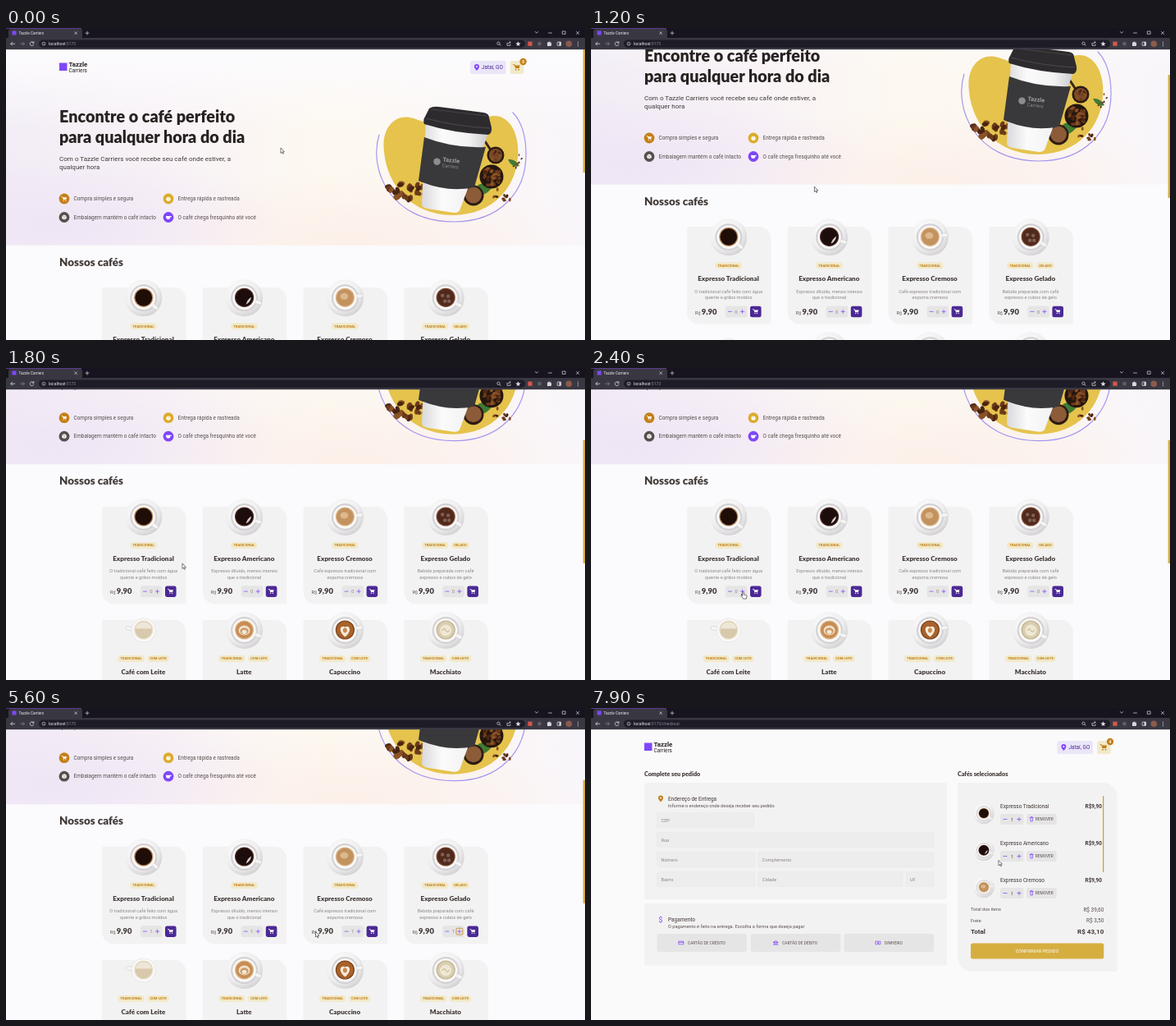
These frames come from a looping animation (706 px wide and 380 px high, 8 s). An HTML page:

```html
<!DOCTYPE html>
<html lang="pt-BR">
<head>
<meta charset="utf-8">
<title>Tazzle Carriers</title>
<style>
html, body { margin: 0; width: 100%; height: 100%; overflow: hidden; background: #fbfafc; }
svg { display: block; width: 706px; height: 380px; font-family: Roboto, sans-serif; }
text { white-space: pre; }
.h { font-family: Lato, sans-serif; font-weight: 900; }
.b { font-weight: 700; }
.m { text-anchor: middle; }
.e { text-anchor: end; }
</style>
</head>
<body>
<svg id="stage" viewBox="0 0 706 380"></svg>
<script>
const PURPLE = '#8047f8', DEEP = '#4b2995', GOLD = '#dbac2c', AMBER = '#c47f17', SAND = '#f1e9c9';
const INK = '#272221', TEXT = '#574f4d', SOFT = '#8d8686', CARD = '#f3f2f2', BUTTON = '#e6e5e5';
const BRAND = ['Tazzle', 'Carriers'];

const text = (x, y, s, size, fill = TEXT, cls = '') =>
  `<text x="${x}" y="${y}" font-size="${size}" fill="${fill}" class="${cls}">${s}</text>`;
const rect = (x, y, w, h, fill, r = 0, more = '') =>
  `<rect x="${x}" y="${y}" width="${w}" height="${h}" rx="${r}" fill="${fill}" ${more}/>`;
const disc = (x, y, r, fill, more = '') => `<circle cx="${x}" cy="${y}" r="${r}" fill="${fill}" ${more}/>`;
const oval = (x, y, rx, ry, fill, turn = 0) =>
  `<ellipse cx="${x}" cy="${y}" rx="${rx}" ry="${ry}" fill="${fill}" transform="rotate(${turn} ${x} ${y})"/>`;
const fillPath = (d, fill, more = '') => `<path d="${d}" fill="${fill}" ${more}/>`;
const line = (d, color, w = 1, more = '') =>
  `<path d="${d}" fill="none" stroke="${color}" stroke-width="${w}" stroke-linecap="round" stroke-linejoin="round" ${more}/>`;
const at = (x, y, body, scale = 1) => `<g transform="translate(${x} ${y}) scale(${scale})">${body}</g>`;
const group = (id, body) => `<g id="${id}">${body}</g>`;

// Panel with small and large corners alternating
const petal = (x, y, w, h, r, R) => fillPath(
  `M${x + r} ${y}h${w - r - R}a${R} ${R} 0 0 1 ${R} ${R}v${h - R - r}a${r} ${r} 0 0 1 ${-r} ${r}` +
  `h${r + R - w}a${R} ${R} 0 0 1 ${-R} ${-R}v${R + r - h}a${r} ${r} 0 0 1 ${r} ${-r}z`, CARD);

const cart = (x, y, s, color) => at(x, y,
  line('M-4-3.2h1.3l.5 1.5', color, 1) + fillPath('M-2.6-2.2H4L3 1.3H-1.6z', color) +
  disc(-1, 2.9, .9, color) + disc(2.4, 2.9, .9, color), s);
const pin = (x, y, color) => at(x, y,
  fillPath('M0 4C-2 1.8-3 .4-3-1a3 3 0 0 1 6 0C3 .4 2 1.8 0 4z', color) + disc(0, -1, 1, '#fff'));
const sign = (x, y, plus) => line(`M${x - 2.1} ${y}h4.2` + (plus ? `M${x} ${y - 2.1}v4.2` : ''), PURPLE, .75);

let seed = 7;
const rnd = () => (seed = seed * 16807 % 2147483647) / 2147483647;
const beans = (x, y, rx, ry, n, size) => {
  let out = '';
  for (let i = 0; i < n; i++) {
    const a = rnd() * 6.28, d = Math.sqrt(rnd());
    out += oval(x + Math.cos(a) * d * rx, y + Math.sin(a) * d * ry, size, size * .65,
      ['#4a2511', '#6b3a1b', '#8a5227'][i % 3], rnd() * 180);
  }
  return out;
};

// [coffee, rim, handle angle, surface drawing]
const CUPS = {
  espresso: ['#1f0d07', '#b98d62', 38, ''],
  americano: ['#1c0d0c', '#4a2a22', 18, fillPath('M2 8C6 6 8 3 8.5-1C5 1 3 4 2 8z', '#d8d0cc')],
  cremoso: ['#c2925f', '#dcb78d', -8, oval(-1, -2, 5, 4, '#dcb88c')],
  gelado: ['#50291d', '#7a4630', 28, [[-4, -3], [3, -2], [-1, 4], [4, 4]].map(([x, y]) => rect(x - 2, y - 2, 4, 4, '#806052', 1)).join('')],
  leite: ['#d8c8ac', '#e9dfcd', 188, fillPath('M-10-2A10.2 10.2 0 0 1 10-2z', '#eee6d6')],
  latte: ['#c78d55', '#e0bd91', 20, oval(0, 0, 7, 6, '#f0dfc6') + oval(0, 1, 5, 4, '#c99663') + oval(0, 2, 3, 2.4, '#f4e8d6')],
  capuccino: ['#a9622b', '#7a421c', -10, fillPath('M0 8C-9 1-6-7 0-4C6-7 9 1 0 8z', '#f6ecdd') + oval(0, 0, 2.5, 3, '#c98a50')],
  macchiato: ['#d9cdb0', '#c2b390', 25, oval(0, 0, 7, 7, '#eee7d3') + line('M-4 0q2-4 4 0t4 0', '#bda97e', 1)],
};
const mug = (x, y, kind, scale = 1) => {
  const [coffee, rim, angle, art] = CUPS[kind];
  const saucer = kind === 'leite' ? '' : disc(0, 0, 22.5, 'url(#plate)') + disc(0, 0, 16.5, '#d3d0d2');
  return at(x, y, saucer + rect(9, -2.2, 13, 4.4, '#f6f5f5', 2, `stroke="#c9c6c8" stroke-width=".5" transform="rotate(${angle})"`) +
    disc(0, 0, 14.5, '#fbfafa', 'stroke="#dddadd" stroke-width=".6"') + disc(0, -.5, 11.6, rim) + disc(0, -.5, 10.4, coffee) + art, scale);
};

const header = (dx, count) =>
  rect(65, 42.5, 9.5, 9.5, PURPLE) +
  text(76.5, 46.8, BRAND[0], 7.9, INK, 'b') + text(76.5, 54, BRAND[1], 6.4, INK) +
  rect(566 + dx, 40, 43.5, 16, '#ebe5f9', 2.5) + pin(574 + dx, 48, PURPLE) + text(580 + dx, 50.4, 'Jataí, GO', 6.45, DEEP) +
  rect(614.8 + dx, 40, 16.5, 16, SAND, 2.5) + cart(622.7 + dx, 47.8, 1, AMBER) +
  disc(630.6 + dx, 41, 4.2, AMBER) + text(630.6 + dx, 42.8, count, 4.9, '#fff', 'b m');

const picture =
  fillPath('M461 151C457 120 476 103 497 110C520 118 555 132 580 112C600 99 621 112 624 143C628 190 596 228 545 228C495 228 465 192 461 151z', '#e5c34d') +
  line('M455 130C442 172 468 236 546 236C602 236 635 200 634 152C634 131 628 113 618 103', '#a596ee', 1.2) +
  beans(488, 198, 26, 11, 30, 4) +
  fillPath('M570 202C574 186 586 187 592 195C586 203 578 206 570 202zM612 160q9-1 14 8q-9 3-14-8z', '#3f7a35') +
  line('M596 156L584 138', '#3a2618', 3) + disc(597, 155, 10.5, '#2b1a12') + disc(597, 155, 8, '#7b4a2a') + beans(597, 155, 6, 6, 9, 2.2) +
  disc(592, 181, 14.5, '#24160f') + beans(592, 181, 11, 11, 34, 2.8) +
  disc(570, 204, 12.5, '#2c1b12') + disc(570, 203.5, 10, '#8c5c39') +
  beans(606, 202, 15, 9, 9, 2.3) + beans(624, 164, 6, 12, 7, 1.4) +
  fillPath('M512 114L589 126L554 220Q553 225 546 225L514 220Q507 219 507 214z', 'url(#paper)') +
  fillPath('M510 133Q546 147 585 145L571 194Q537 201 503 186z', '#39383a') +
  fillPath('M516 98Q520 95 528 96L582 103Q589 104 589 109L592 121Q593 128 588 130Q545 128 510 117Q508 112 511 108z', '#2d2b2d') +
  line('M512 110Q549 120 590 122', '#4c4a4c', 1) + line('M519 99Q551 103 586 107', '#454345', 1.2) +
  `<g transform="rotate(6 538 164)">${disc(525.5, 164, 4.3, '#8d8b8d')}${text(532, 163, BRAND[0], 7.2, '#a09ea0', 'b')}${text(532, 170, BRAND[1], 5.8, '#8d8b8d')}</g>`;

const FEATURES = [
  [71, 208, AMBER, 'Compra simples e segura', cart(71, 208, .75, '#fff')],
  [198, 208, GOLD, 'Entrega rápida e rastreada', disc(198, 208.3, 2.6, '#fff') + line('M198 206.8v1.6', GOLD, .6)],
  [71, 230.5, TEXT, 'Embalagem mantém o café intacto', fillPath('M71 227.5l2.7 1.4v3.2l-2.7 1.4l-2.7-1.4v-3.2z', '#fff') + line('M68.5 229l2.5 1.3l2.5-1.3M71 230.3v3', TEXT, .4)],
  [198, 230.5, PURPLE, 'O café chega fresquinho até você', fillPath('M195 229h5.6q0 4-2.8 4t-2.8-4z', '#fff') + line('M200.5 229.6h1', '#fff', .9)],
];
const hero =
  rect(0, 26, 706, 238.5, 'url(#wash)') + rect(0, 26, 706, 238.5, 'url(#pink)') + rect(0, 26, 706, 238.5, 'url(#lilac)') + rect(0, 26, 706, 100, 'url(#fade)') +
  header(0, 0) +
  text(65, 115, 'Encontre o café perfeito', 19.8, INK, 'h') + text(65, 140, 'para qualquer hora do dia', 19.8, INK, 'h') +
  text(65, 161.6, `Com o ${BRAND.join(' ')} você recebe seu café onde estiver, a`, 8.05, '#403937') +
  text(65, 172, 'qualquer hora', 8.05, '#403937') +
  FEATURES.map(([x, y, c, s, icon]) => disc(x, y, 6.4, c) + icon + text(x + 11.5, y + 2.3, s, 6.45)).join('') + picture;

const TAG = { TRADICIONAL: 32.5, GELADO: 22, 'COM LEITE': 26.5 };
const tags = (cx, y, names) => {
  let x = cx - (names.reduce((sum, n) => sum + TAG[n] + 3.5, -3.5)) / 2;
  return names.map(n => {
    const out = rect(x, y, TAG[n], 8, SAND, 4) + text(x + TAG[n] / 2, y + 5.4, n, 4.05, AMBER, 'b m');
    x += TAG[n] + 3.5;
    return out;
  }).join('');
};
const MENU = [
  ['espresso', 'Expresso Tradicional', ['TRADICIONAL'], 'O tradicional café feito com água', 'quente e grãos moídos'],
  ['americano', 'Expresso Americano', ['TRADICIONAL'], 'Expresso diluído, menos intenso', 'que o tradicional'],
  ['cremoso', 'Expresso Cremoso', ['TRADICIONAL'], 'Café expresso tradicional com', 'espuma cremosa'],
  ['gelado', 'Expresso Gelado', ['TRADICIONAL', 'GELADO'], 'Bebida preparada com café', 'expresso e cubos de gelo'],
  ['leite', 'Café com Leite', ['TRADICIONAL', 'COM LEITE']],
  ['latte', 'Latte', ['TRADICIONAL', 'COM LEITE']],
  ['capuccino', 'Capuccino', ['TRADICIONAL', 'COM LEITE']],
  ['macchiato', 'Macchiato', ['TRADICIONAL', 'COM LEITE']],
];
const cardX = i => 117 + 122.8 * (i % 4);
const card = ([kind, name, labels, desc, desc2], i) => {
  const x = cardX(i), y = i < 4 ? 316 : 454, cx = x + 51;
  let out = petal(x, y, 102.5, 118.5, 2.5, 14.5) + mug(cx - .2, y + 12.8, kind) + tags(cx - .4, y + 43.3, labels) +
    text(cx - .5, y + 66, name, 8.1, '#403937', 'h m');
  if (desc) out += text(cx - .3, y + 80.5, desc, 5.63, SOFT, 'm') + text(cx - .3, y + 88.3, desc2, 5.63, SOFT, 'm') +
    text(x + 10, y + 106.5, 'R$', 5.63) + text(x + 17.7, y + 106.5, '9,90', 9.5, '#403937', 'h') +
    rect(x + 47, y + 96.5, 26.5, 14, BUTTON, 2.4) + sign(x + 52.5, y + 103.4) + sign(x + 67.5, y + 103.4, true) +
    `<text id="count${i}" x="${x + 60}" y="${y + 105.5}" font-size="6" fill="${SOFT}" class="m">0</text>` +
    rect(x + 63.6, y + 99.5, 7.8, 7.8, 'none', 1.2, `id="ring${i}" stroke="${AMBER}" stroke-width=".8"`) +
    rect(x + 77, y + 96.7, 13.6, 13.6, DEEP, 2.4, `id="add${i}"`) + cart(x + 83.7, y + 103.3, .8, '#fff');
  return out;
};
const home = hero + text(65, 289.5, 'Nossos cafés', 13.4, '#403937', 'h') + MENU.map(card).join('');

const field = (x, y, w, label) =>
  rect(x, y, w, 18, '#eeeded', 1.6, `stroke="${BUTTON}" stroke-width=".5"`) + text(x + 5, y + 11, label, 5.63, SOFT);
const pay = (x, label, dx, icon) => rect(x, 275, 109.6, 22, BUTTON, 2.5) + at(x + dx, 286, icon) + text(x + dx + 8, 287.8, label, 4.83);
const item = ([kind, name], i) => {
  const y = 45 * i;
  return mug(479, y + 128.5, kind, .56) + text(499, y + 122.4, name, 6.45, '#403937') +
    text(623, y + 122.2, 'R$9,90', 6.45, '#403937', 'b e') +
    rect(499, y + 129, 28.5, 13, BUTTON, 2.4) + sign(505, y + 135.5) + text(513.5, y + 137.8, 1, 6.2, TEXT, 'm') + sign(522, y + 135.5, true) +
    rect(531, y + 129, 36.8, 13, BUTTON, 2.4) + text(541.8, y + 137.2, 'REMOVER', 4.83) +
    line(`M535 ${y + 133.4}h4.4M536 ${y + 133.4}v4.6h2.4v-4.6M536.6 ${y + 132.5}h1.2`, PURPLE, .7);
};
const bill = line('M-2.8-1.8h5.6v3.6h-5.6z', PURPLE, .7);
const checkout = rect(0, 26, 706, 354, '#fafafa') + header(2.4, 4) +
  text(65, 83, 'Complete seu pedido', 7.2, '#403937', 'h') + text(447, 83, 'Cafés selecionados', 7.2, '#403937', 'h') +
  rect(65, 91, 369, 142, CARD, 2.5) + pin(85, 110.5, AMBER) +
  text(94, 113, 'Endereço de Entrega', 6.45, '#403937') + text(94, 120.8, 'Informe o endereço onde deseja receber seu pedido', 5.63) +
  field(80.5, 127.7, 118.5, 'CEP') + field(80.5, 151.5, 337.5, 'Rua') +
  field(80.5, 175.5, 119.5, 'Número') + field(203.8, 175.5, 214.2, 'Complemento') +
  field(80.5, 199.5, 119.5, 'Bairro') + field(203.8, 199.5, 176.4, 'Cidade') + field(384, 199.5, 34, 'UF') +
  rect(65, 238, 369, 75.5, CARD, 2.5) + text(85, 261, '$', 8.5, PURPLE, 'm') +
  text(94, 260.3, 'Pagamento', 6.45, '#403937') + text(94, 268, 'O pagamento é feito na entrega. Escolha a forma que deseja pagar', 5.63) +
  pay(80.5, 'CARTÃO DE CRÉDITO', 29.5, bill + line('M-2.8-.6h5.6', PURPLE, .7)) +
  pay(194.7, 'CARTÃO DE DÉBITO', 30.5, line('M-2.8-.8L0-2.6L2.8-.8zM-1.8-.5v2M0-.5v2M1.8-.5v2M-2.8 2.2h5.6', PURPLE, .7)) +
  pay(308.6, 'DINHEIRO', 41.5, bill + disc(0, 0, 1, PURPLE)) +
  petal(447, 91, 194.5, 230, 2.5, 17.5) + MENU.slice(0, 3).map(item).join('') + rect(624, 107, 1.3, 93, '#c9a23c') +
  text(463, 247.3, 'Total dos itens', 5.63) + text(625.3, 247.5, 'R$ 39,60', 6.45, TEXT, 'e') +
  text(463, 260.5, 'Frete', 5.63) + text(625.3, 260.8, 'R$ 3,50', 6.45, TEXT, 'e') +
  text(463, 275.3, 'Total', 8.05, '#403937', 'b') + text(625.3, 275.3, 'R$ 43,10', 8.05, '#403937', 'b e') +
  rect(463, 286.5, 162.3, 19, '#d6ae40', 2.5) + text(544, 298, 'CONFIRMAR PEDIDO', 5.63, '#fff', 'm');

const PALE = '#d9d6de';
const browser =
  rect(0, 0, 706, 12.5, '#17141f') + rect(0, 0, 92, .8, '#6b46a8') + rect(3, 1, 90, 14, '#393842', 3) + rect(0, 12, 706, 14.2, '#393842') +
  rect(7.5, 3.5, 5, 5, PURPLE) + text(15.5, 7.9, BRAND.join(' '), 4.65, '#eeeaf2') +
  line('M83.8 4.8l2.8 2.8m0-2.8l-2.8 2.8M97 6.2h4m-2-2v4M645.2 4.5l1.8 1.7l1.8-1.7M661.5 6h4M678.7 4h3.4v3.4h-3.4zM695.5 4.4l3.2 3.2m0-3.2l-3.2 3.2', PALE, .7) +
  rect(40, 14.4, 593, 9.6, '#1e1c27', 4.8) +
  line('M10.8 19.2h-5m2-2l-2 2l2 2M33.7 18a2.4 2.4 0 1 0 .1 2.2M33.8 16.6v1.6h-1.6', PALE, .8) +
  line('M17.5 19.2h5m-2-2l2 2l-2 2', '#85828c', .8) +
  disc(46, 19.2, 2, 'none', `stroke="${PALE}" stroke-width=".6"`) + line('M46 19v1.2', PALE, .6) +
  `<text x="52" y="21" font-size="5.05" fill="#f2f0f5">localhost<tspan fill="#8b8894">:5173<tspan id="path"></tspan></tspan></text>` +
  disc(600.5, 18.7, 1.7, 'none', `stroke="${PALE}" stroke-width=".7"`) +
  line('M601.8 20l1.5 1.5M611 18v3.4h4v-1.6M612 19.5q.5-2.2 3-2.2m-1-1l1.2 1l-1.2 1', PALE, .7) +
  fillPath('M624.5 16.3l.9 2l2.2.2l-1.7 1.4l.5 2.2l-1.9-1.2l-1.9 1.2l.5-2.2l-1.7-1.4l2.2-.2z', PALE) +
  rect(636.4, 16.6, 5.2, 5.2, '#d8564c') + disc(650.5, 19.2, 2.4, '#605d68') +
  fillPath('M660 17.5h1.4a1 1 0 0 1 2 0h1.4v1.6a1 1 0 0 1 0 1.7v1.3h-4.8z', PALE) +
  rect(672.2, 17, 4.4, 4.4, 'none', .4, `stroke="${PALE}" stroke-width=".8"`) + rect(674.5, 17, 2.1, 4.4, PALE) +
  disc(686.3, 19.2, 3.8, '#8d5a4c') + [17, 19.2, 21.4].map(y => disc(697.5, y, .6, PALE)).join('');

const pointer =
  fillPath('M0 0V6.4L1.5 5.1L2.5 7.3L3.5 6.9L2.5 4.7H4.4z', '#fff', 'id="arrow" stroke="#222" stroke-width=".6"') +
  fillPath('M-.8.4Q0-.6.8.4V3.4L3.8 4.2Q4.6 4.5 4.5 5.4L3.9 8.6H.1L-2.2 5.3Q-2-.0 -.8 5z', '#fff', 'id="hand" stroke="#222" stroke-width=".6"');

const stop = (o, c, a = 1) => `<stop offset="${o}" stop-color="${c}" stop-opacity="${a}"/>`;
const glow = (id, cx, cy, r, c) => `<radialGradient id="${id}" cx="${cx}" cy="${cy}" r="${r}">${stop(0, c)}${stop(1, c, 0)}</radialGradient>`;
const $ = id => document.getElementById(id);
$('stage').innerHTML = `<defs>
  <linearGradient id="wash">${stop(0, '#f2edf6')}${stop(.3, '#f9f3f6')}${stop(.55, '#fdf9f0')}${stop(.8, '#fbf6f5')}${stop(1, '#f9f6fb')}</linearGradient>
  <linearGradient id="fade" x2="0" y2="1">${stop(0, '#fcfbfd')}${stop(.3, '#fcfbfd', .8)}${stop(1, '#fcfbfd', 0)}</linearGradient>
  <linearGradient id="paper">${stop(0, '#d9d9dc')}${stop(.3, '#fbfbfb')}${stop(.7, '#f2f2f3')}${stop(1, '#c9c9cd')}</linearGradient>
  <radialGradient id="plate" cx=".4" cy=".35" r=".7">${stop(0, '#ffffff')}${stop(.65, '#f0eff0')}${stop(1, '#cfcdd0')}</radialGradient>
  ${glow('pink', .6, 1, .4, '#fcefe9')}${glow('lilac', .08, .9, .4, '#efe5f5')}</defs>` +
  rect(0, 0, 706, 380, '#fbfafc') + group('home', home) + rect(703.6, 26, 2.4, 150, '#d8b040', 0, 'id="thumb"') +
  group('checkout', checkout) + browser + group('pointer', pointer);

const LOOP = 8000, NAV = 7100;
const CLICKS = [2600, 3600, 4500, 5400, 5900];
const SCROLL = [[800, 0], [900, 22], [1000, 37], [1200, 74], [1300, 105], [1400, 111], [1500, 111], [1600, 136], [1700, 147.3]];
const MOVES = [
  [300, 335, 146], [900, 318, 183], [1400, 242, 200], [1800, 215, 238], [2300, 185.5, 272.5], [2800, 185.5, 272.5],
  [3300, 308, 272], [3600, 308, 272], [4200, 424.5, 277], [4400, 431, 273], [4600, 431, 273], [5200, 554, 272],
  [5400, 554, 272], [5800, 201, 273], [5900, 201, 273], [6100, 324, 272], [6200, 324, 272], [6400, 447, 272],
  [6500, 447, 272], [6600, 570, 270], [7200, 571, 270], [7600, 343, 111], [7900, 497, 185.5],
];
function track(keys, t) {
  const n = keys.findIndex(k => k[0] > t);
  if (n < 0) return keys[keys.length - 1].slice(1);
  if (n === 0) return keys[0].slice(1);
  const a = keys[n - 1], b = keys[n], k = (t - a[0]) / (b[0] - a[0]);
  return a.slice(1).map((v, i) => v + (b[i + 1] - v) * k);
}
const show = (id, on) => $(id).setAttribute('visibility', on ? 'visible' : 'hidden');

function draw(t) {
  const paying = t >= NAV;
  const [scroll] = track(SCROLL, t), [x, y] = track(MOVES, t);
  $('home').setAttribute('transform', `translate(0 ${-scroll})`);
  $('thumb').setAttribute('y', 26 + scroll * .42);
  $('checkout').style.display = paying ? '' : 'none';
  $('path').textContent = paying ? '/checkout' : '';

  let hand = false;
  for (let i = 0; i < 4; i++) {
    const dx = x - cardX(i), inRow = !paying && scroll > 147 && y > 265 && y < 279.5;
    const onAdd = inRow && Math.abs(dx - 83.8) < 7;
    hand = hand || onAdd || (inRow && Math.abs(dx - 67.5) < 5);
    $('add' + i).setAttribute('fill', onAdd ? PURPLE : DEEP);
    $('count' + i).textContent = t >= CLICKS[i] ? 1 : 0;
    $('ring' + i).style.display = t >= CLICKS[i] && t < CLICKS[i + 1] ? '' : 'none';
  }
  show('hand', hand);
  show('arrow', !hand);
  $('pointer').setAttribute('transform', `translate(${x} ${y})`);
}
function tick() {
  draw(Math.floor(performance.now() % LOOP / 100) * 100);
  requestAnimationFrame(tick);
}
tick();
</script>
</body>
</html>
```
